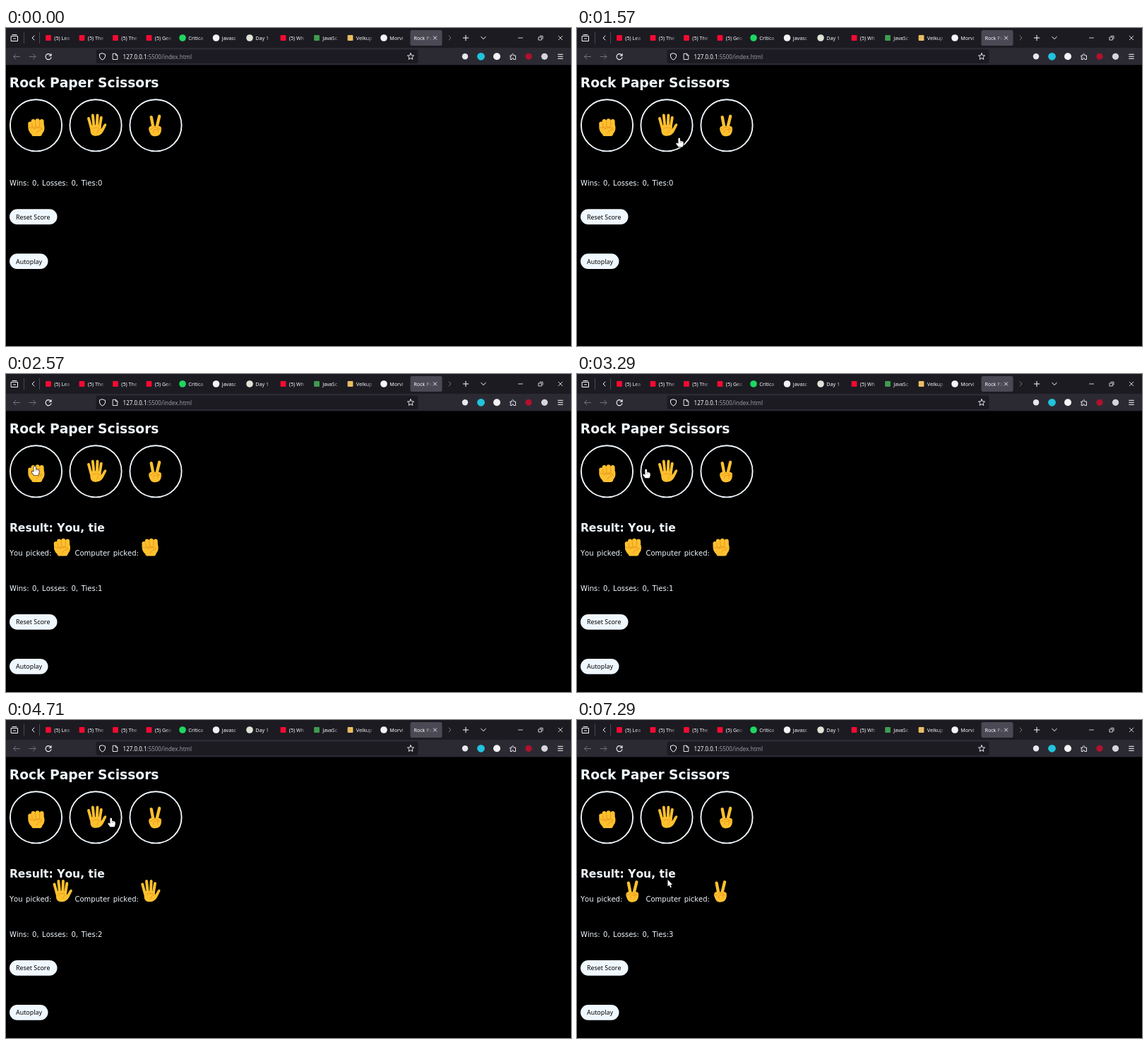
These frames come from a looping animation (800x450 px, 8 s). An HTML page with a canvas:

```html
<!DOCTYPE html>
<html lang="en">
<head>
<meta charset="utf-8">
<title>Rock Paper Scissors</title>
<style>
  html, body { margin: 0; width: 100%; height: 100%; overflow: hidden; background: #000; }
  canvas { display: block; }
</style>
</head>
<body>
<canvas id="stage" width="800" height="450"></canvas>
<script>
const ctx = document.getElementById('stage').getContext('2d');
const LOOP = 8000, FRAME = 1000 / 7;
const BAR = '#1c1b22', TOOLBAR = '#2b2a33', LIGHT = '#fbfbfe', PAGE_INK = '#f0f8ff';
const SKIN = '#ffc02e', CREASE = '#e2941c';
const PAGE_FONT = '"DejaVu Sans", Verdana, sans-serif';
const UI_FONT = '"Noto Sans", "Open Sans", sans-serif';

// Pointer keys: frame index, x, y of the tip
const POINTER = [
  [5, 640, 300], [7, 430, 232], [9, 308, 190], [10, 308, 190], [11, 144, 155],
  [14, 72, 139], [17, 40, 130], [20, 40, 130], [23, 97, 134], [28, 131, 139],
  [29, 131, 139], [31, 123, 138], [32, 123, 138], [33, 148, 138], [36, 211, 137],
  [37, 205, 139], [47, 205, 139], [48, 209, 140], [51, 128.5, 226], [56, 128.5, 226]
];
const ROUNDS = [[18, 'rock'], [30, 'paper'], [42, 'scissors']];
const CHOICES = [[42.5, 'rock'], [127, 'paper'], [212, 'scissors']];

function text(str, x, y, font, color, wordGap = 0) {
  ctx.font = font;
  ctx.fillStyle = color;
  ctx.wordSpacing = wordGap + 'px';
  ctx.fillText(str, x, y);
}

function box(x, y, w, h, r, color) {
  ctx.fillStyle = color;
  ctx.beginPath();
  ctx.roundRect(x, y, w, h, r);
  ctx.fill();
}

function dot(x, y, r, color) {
  ctx.fillStyle = color;
  ctx.beginPath();
  ctx.arc(x, y, r, 0, 7);
  ctx.fill();
}

function stroke(d, x, y, color = LIGHT, width = 1) {
  ctx.save();
  ctx.translate(x, y);
  ctx.strokeStyle = color;
  ctx.lineWidth = width;
  ctx.lineCap = ctx.lineJoin = 'round';
  ctx.stroke(new Path2D(d));
  ctx.restore();
}

function fill(d, x, y, color) {
  ctx.save();
  ctx.translate(x, y);
  ctx.fillStyle = color;
  ctx.fill(new Path2D(d));
  ctx.restore();
}

const emoji = {
  rock(x, y) {
    stroke('M-8.8-5.2-8.3 2M-4.4-8.6-4 0M1.6-9.4 1.5 0M7.6-8.6 7.8 0', x, y, SKIN, 6);
    fill('M-11.5-2-8-6H9L11.3-2C12 3 10.8 6 8.5 8.5Q7.8 12.3 5 12.3H-4Q-6.5 12.3-7 9.5C-10 7-11.5 4-11.5-2Z', x, y, SKIN);
    stroke('M-6.3-5.5-5.8 0M-1.3-8-1-1.5M4.6-8 4.8-2M-10.5-.3Q-8 2-5.8 0Q-3.5 1-1-1Q2 .5 4.8-1.5M-4.5 2Q1 0 7 .5Q9.5 2.5 6 3.7Q1 4 .5 8', x, y, CREASE, 0.9);
  },
  paper(x, y) {
    stroke('M-11-9.3-7.4 4M-5.2-13.7-3.4 3M1.4-13.7.8 3M6.8-10.6 4.5 4', x, y, SKIN, 3.9);
    fill('M-9.2.5Q-2-.5 6.2.5L6.8 5.5C8.8 3.5 9.5-.5 12-1.8C14-2.4 14.7-.8 14 .8C11.5 5 10.5 9.5 7 12.7Q3.5 15.7-1 15.6C-6 15.4-8.4 13-8.6 8Z', x, y, SKIN);
    stroke('M6.2 5Q1.5 6 1 11M-5.5 5Q-2 3 3.5 4', x, y, CREASE, 0.8);
  },
  scissors(x, y) {
    stroke('M-5.6-11.6-2.6 4M5.9-13 1.8 4', x, y, SKIN, 4.3);
    fill('M-8 2Q-5.5 0-3.5 1H4Q8.2.5 8.7 4C8.8 9 7.6 12 5.3 14Q3 15.6-1.5 15.4C-5.5 15.2-6.7 12.5-8.2 9Q-10.3 4-8 2Z', x, y, SKIN);
    stroke('M-8 5Q-5 7-3.5 3.5Q-1 1.5 2 2.5Q5 3 4 5.2Q1.5 6-1 5.7Q-4 7.5-2.5 10M4.5 4.5Q7 7 8.2 4M3.8 6Q4.8 9 2.8 10', x, y, CREASE, 0.9);
  }
};
// Vertical centre of each hand inside its button
const HAND_Y = { rock: 140.7, paper: 137.2, scissors: 137.8 };

function drawTabs() {
  box(0, 0, 800, 28, 0, BAR);
  stroke('M-4.5-2.5H4.5V4.5H-4.5ZM-3-4.5H3M-1.5 1H1.5', 12, 14);
  box(25, 6, 1, 16, 0, '#4a4953');
  stroke('M1.5-3-1.5 0 1.5 3', 38.5, 14);
  box(47, 6, 1, 16, 0, '#4a4953');

  const red = '#f50a32', green = '#3f9c4f';
  const tabs = [
    ['(5) Lea', red, 1], ['(5) The', red, 1], ['(5) The', red, 1], ['(5) Geo', red, 1],
    ['Critica', '#1ed760', 0], ['javasc', '#f4f4f6', 0], ['Day 1', '#dfe5d6', 0],
    ['(5) Wh', red, 1], ['JavaSc', green, 1], ['Velkup', '#e9bd62', 1], ['Morvi', '#f4f4f6', 0]
  ];
  tabs.forEach(([label, color, square], i) => {
    const x = 60 + i * 47.5;
    if (square) box(x - 3.9, 10.1, 7.8, 7.8, 1, color);
    else dot(x, 14, 4.8, color);
    fadedText(label, x + 8.3);
  });

  box(572.5, 3, 45, 22, 2.5, '#4a4954');
  fadedText('Rock Pa', 577.5);
  stroke('M-2.2-2.2 2.2 2.2M2.2-2.2-2.2 2.2', 607.5, 14, LIGHT, 0.9);
  stroke('M-1.5-3 1.5 0-1.5 3', 628.5, 14, '#77767f');
  stroke('M-3.7 0H3.7M0-3.7V3.7', 651, 14);
  stroke('M-3.3-1.6 0 1.6 3.3-1.6', 676, 14);
  stroke('M-3 0H3', 728.5, 14, LIGHT, 0.8);
  stroke('M-2.7-1H1.3V3H-2.7ZM-1-2.7H3V1.3', 757, 14, LIGHT, 0.8);
  stroke('M-2.8-2.8 2.8 2.8M2.8-2.8-2.8 2.8', 785, 14, LIGHT, 0.8);
}

function fadedText(label, x) {
  const shade = ctx.createLinearGradient(x + 14, 0, x + 26, 0);
  shade.addColorStop(0, LIGHT);
  shade.addColorStop(1, LIGHT + '00');
  text(label, x, 16.6, '7.1px ' + UI_FONT, shade);
}

function drawToolbar() {
  box(0, 28, 800, 25, 0, TOOLBAR);
  box(0, 52, 800, 1, 0, '#0e0d13');
  stroke('M4.5 0H-4.5M-1-3.5-4.5 0-1 3.5', 15, 40.5, '#72717a');
  stroke('M-4.5 0H4.5M1-3.5 4.5 0 1 3.5', 37.5, 40.5, '#72717a');
  stroke('M3.5-2A4 4 0 1 0 4 1M4-4V-1.3H1.2', 60, 40.5, LIGHT, 1.1);

  box(127.5, 30.5, 456, 19.5, 2.5, BAR);
  stroke('M0-4.5 4-3V0Q3.5 3.2 0 4.8Q-3.5 3.2-4 0V-3Z', 136.5, 40.3);
  stroke('M-3-4H1L3.3-1.7V4.2H-3ZM.8-4V-1.5H3.3', 154.5, 40.3, LIGHT, 0.9);
  const font = '8px ' + UI_FONT;
  text('127.0.0.1', 165.6, 43.6, font, LIGHT);
  text(':5500/index.html', 165.6 + ctx.measureText('127.0.0.1').width, 43.6, font, '#9a99a2');

  let star = '';
  for (let i = 0; i < 10; i++) {
    const r = i % 2 ? 2.2 : 4.8, a = i * Math.PI / 5 - Math.PI / 2;
    star += (i ? 'L' : 'M') + r * Math.cos(a) + ' ' + r * Math.sin(a);
  }
  stroke(star + 'Z', 573, 40.5, LIGHT, 0.9);

  dot(650, 40.3, 4.2, '#e8e8ee');
  dot(672.5, 40.3, 5.4, '#20c4dc');
  dot(695, 40.3, 5, '#f4f4f6');
  stroke('M-3.8-1.5H-1.6V-3Q-.4-5.3.8-3V-1.5H3.5V4H.8Q.5 1.8-.8 2Q-1.8 2.2-1.7 4H-3.8V1.5Q-1.5.6-3.8.1Z', 718, 40.5, LIGHT, 0.9);
  dot(740, 40.3, 4.6, '#b3102c');
  dot(762.5, 40.3, 4.6, '#d5d5da');
  stroke('M-3.3-3H3.3M-3.3 0H3.3M-3.3 3H3.3', 785, 40.3);
}

function pill(label, y, w) {
  box(5, y, w, 21.7, 10.85, PAGE_INK);
  text(label, 14, y + 14.3, '500 8.9px ' + UI_FONT, '#000');
}

function drawPage(frame) {
  const body = '10px ' + PAGE_FONT;
  text('Rock Paper Scissors', 4.8, 84, 'bold 18.7px ' + PAGE_FONT, PAGE_INK);
  for (const [x, hand] of CHOICES) {
    ctx.strokeStyle = PAGE_INK;
    ctx.lineWidth = 1.9;
    ctx.beginPath();
    ctx.arc(x, 137.8, 36.6, 0, 7);
    ctx.stroke();
    emoji[hand](hand === 'rock' ? 43 : hand === 'paper' ? 128 : 211.3, HAND_Y[hand]);
  }

  const played = ROUNDS.filter(([start]) => frame >= start);
  const shift = played.length ? 83.8 : 0;
  if (played.length) {
    const hand = played[played.length - 1][1];
    text('Result: You, tie', 4.9, 222.6, 'bold 15.55px ' + PAGE_FONT, PAGE_INK);
    text('You picked:', 5, 257, body, PAGE_INK, 1.3);
    text('Computer picked:', 97.5, 257, body, PAGE_INK, 1.3);
    const x = hand === 'scissors' ? 78.5 : 79.5;
    emoji[hand](x, HAND_Y[hand] + 104.5);
    emoji[hand](x + 124.7, HAND_Y[hand] + 104.5);
  }
  text(`Wins: 0, Losses: 0, Ties:${played.length}`, 5, 222.9 + shift, body, PAGE_INK, 1.3);
  pill('Reset Score', 256.3 + shift, 67.5);
  pill('Autoplay', 319.2 + shift, 54.5);
}

function pointerAt(frame) {
  const i = POINTER.findIndex(key => key[0] > frame);
  const [f0, x0, y0] = POINTER[i - 1], [f1, x1, y1] = POINTER[i];
  const k = (frame - f0) / (f1 - f0);
  return [x0 + (x1 - x0) * k, y0 + (y1 - y0) * k];
}

function drawPointer(frame) {
  if (frame < POINTER[0][0]) return;
  const [x, y] = pointerAt(frame);
  const overChoice = CHOICES.some(([cx]) => Math.hypot(x - cx, y - 138) < 37.5);
  const shape = overChoice
    ? 'M-.6 1.3Q.7-.3 2 1.3V4.8Q3 4 3.9 5.2Q5 4.7 5.5 5.7Q6.7 5.7 6.7 7.2V9.8L5.6 13.2H-.4L-3.5 9.2Q-4 7.6-2.4 7.5L-.6 8.8Z'
    : 'M0 0V9.4L2.1 7.5 3.7 11.2 5.3 10.5 3.7 6.9H6.6Z';
  stroke(shape, x, y, '#000', 1.2);
  fill(shape, x, y, '#fff');
  if (overChoice) stroke('M2 5V7M3.9 5.5V7.5', x, y, '#555', 0.5);
}

function render(now) {
  const frame = Math.min(55, Math.floor((now % LOOP + 5) / FRAME));
  ctx.fontKerning = 'none';
  box(0, 0, 800, 450, 0, '#000');
  drawTabs();
  drawToolbar();
  drawPage(frame);
  drawPointer(frame);
}

const start = performance.now();
function tick() {
  render(performance.now() - start);
  requestAnimationFrame(tick);
}
tick();
</script>
</body>
</html>
```
